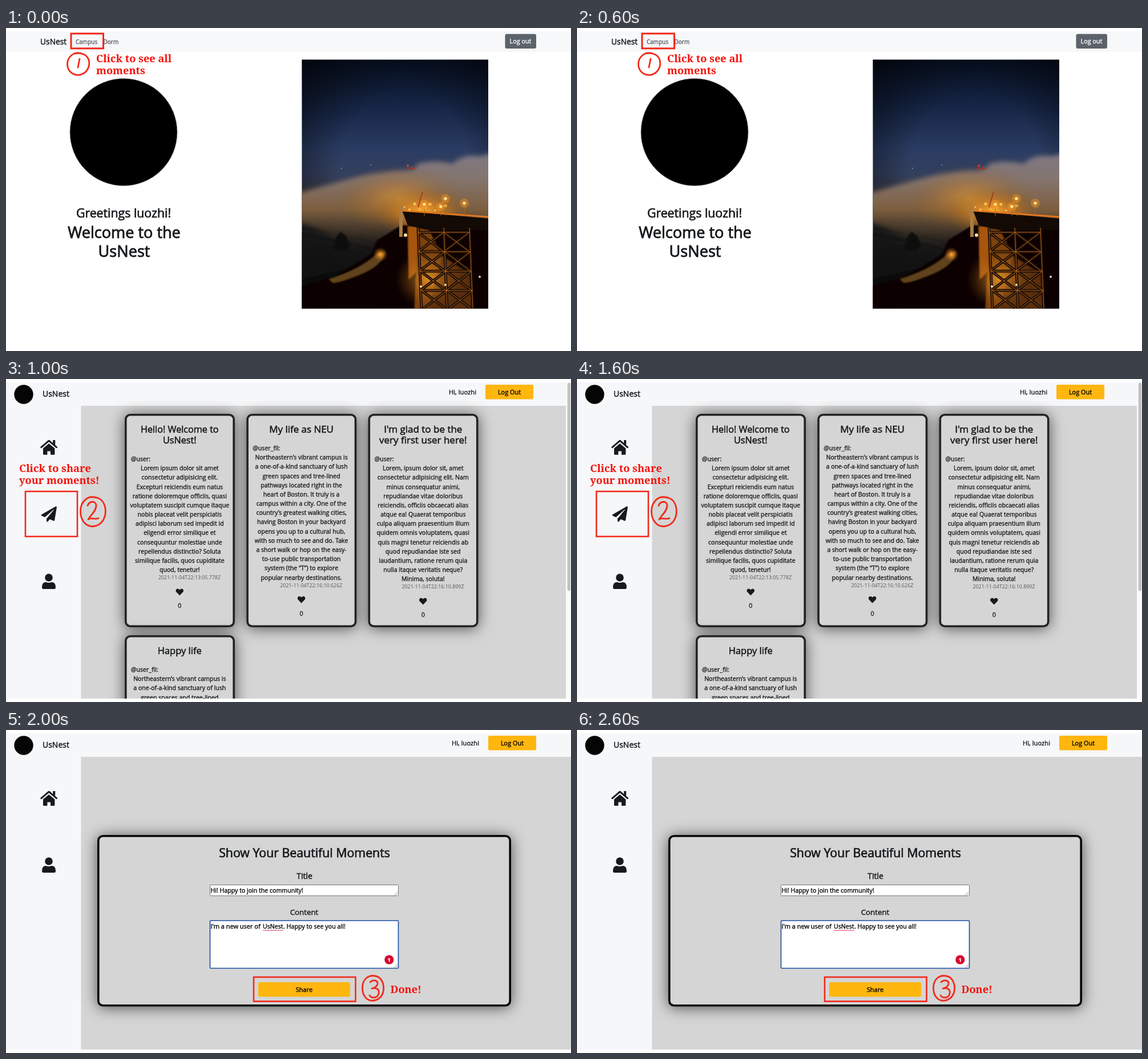
Recreate the animation shown at these times as an HTML page. Size 990 by 566 pixels, loop 3 s.

```html
<!DOCTYPE html>
<html lang="en">
<head>
<meta charset="utf-8">
<title>UsNest walkthrough</title>
<style>
html, body { margin: 0; width: 100%; height: 100%; overflow: hidden; background: #fff; }
svg { display: block; width: 990px; height: 566px; }
text { font-family: "Open Sans", "Noto Sans", sans-serif; white-space: pre; color: #16191c; fill: currentColor; stroke: currentColor; stroke-width: .032em; }
.thin { stroke: none; }
.note { font: bold 18.2px "Noto Serif", serif; color: #f5120a; stroke: none; }
.ink { fill: none; stroke: #f3291a; stroke-linecap: round; stroke-linejoin: round; }
.card { fill: #d5d5d5; stroke-width: 3.6; filter: drop-shadow(0 2px 13px rgba(0,0,0,.62)); }
.icon { fill: #16191d; }
</style>
</head>
<body>
<svg id="stage" viewBox="0 0 990 566">
  <defs>
    <clipPath id="page"><rect y="6" width="990" height="554"/></clipPath>
    <clipPath id="frame"><rect x="518.5" y="55.5" width="326.5" height="436"/></clipPath>
    <linearGradient id="sky" x1="0" y1="0" x2="0" y2="1">
      <stop offset="0" stop-color="#071022"/>
      <stop offset=".2" stop-color="#172748"/>
      <stop offset=".36" stop-color="#2b3c63"/>
      <stop offset=".46" stop-color="#333f5c"/>
      <stop offset=".56" stop-color="#3c3a42"/>
      <stop offset=".7" stop-color="#252322"/>
      <stop offset=".82" stop-color="#0a0909"/>
      <stop offset="1" stop-color="#030303"/>
    </linearGradient>
    <linearGradient id="mist" x1="0" y1="0" x2="0" y2="1">
      <stop offset="0" stop-color="#7e7a88"/>
      <stop offset=".3" stop-color="#84746e"/>
      <stop offset=".6" stop-color="#7d5f3e"/>
      <stop offset="1" stop-color="#3a2c1e" stop-opacity="0"/>
    </linearGradient>
    <radialGradient id="glow">
      <stop offset="0" stop-color="#ffb032"/>
      <stop offset=".35" stop-color="#d98522" stop-opacity=".75"/>
      <stop offset="1" stop-color="#8a5418" stop-opacity="0"/>
    </radialGradient>
    <radialGradient id="shade" cx=".55" cy=".5" r=".72">
      <stop offset=".5" stop-color="#000" stop-opacity="0"/>
      <stop offset="1" stop-color="#000" stop-opacity=".6"/>
    </radialGradient>
    <filter id="soft" x="-30%" y="-30%" width="160%" height="160%"><feGaussianBlur stdDeviation="9"/></filter>
    <filter id="puff" x="-10%" y="-10%" width="120%" height="120%"><feGaussianBlur stdDeviation="4"/></filter>
    <filter id="edge" x="-10%" y="-10%" width="120%" height="120%"><feGaussianBlur stdDeviation="1.3"/></filter>
  </defs>
</svg>
<script>
const stage = document.getElementById('stage');
const LOOP = 3000, STEP = 1000;
const APP = 'UsNest', USER = 'luozhi';
const GREY = '#d5d5d5', PALE = '#f6f7f9', AMBER = '#ffb60f';

const rect = (x, y, w, h, fill, more = '') =>
  `<rect x="${x}" y="${y}" width="${w}" height="${h}" fill="${fill}" ${more}/>`;
const circle = (x, y, r, fill, more = '') =>
  `<circle cx="${x}" cy="${y}" r="${r}" fill="${fill}" ${more}/>`;
const text = (x, y, size, str, more = '') =>
  `<text x="${x}" y="${y}" font-size="${size}" ${more}>${str}</text>`;
const mid = (x, y, size, str, more = '') => text(x, y, size, str, `text-anchor="middle" ${more}`);
const note = (x, y, str) => `<text class="note" x="${x}" y="${y}">${str}</text>`;
const ink = (d, w = 2.8) => `<path class="ink" d="${d}" stroke-width="${w}"/>`;
const box = (x, y, w, h, line) =>
  `<rect class="ink" style="stroke-linejoin:miter" x="${x}" y="${y}" width="${w}" height="${h}" stroke-width="${line}"/>`;
const icon = (d, at = '') => `<path class="icon" d="${d}" transform="${at}"/>`;

// Night photo, reduced to soft tones and plain shapes
function photo() {
  let truss = '';
  for (let i = 0; i < 4; i++) {
    const y = 358 + i * 34, l = 722 + i * 2, r = 812 + i * 2, c = (l + r) / 2;
    truss += `M${l} ${y}H${r}M${l} ${y}L${c} ${y + 34}L${r} ${y}M${l} ${y + 34}L${c} ${y}L${r} ${y + 34}`;
  }
  truss += 'M722 350L728 492M767 350L773 492M812 350L818 492';
  let lamps = '';
  for (let i = 0; i < 9; i++)
    lamps += circle(698 + i * 9, 314 + 6 * Math.sin(i * 2.3), 1.6 + (i % 3) * .5, '#ffc04a');
  const posts = [[770, 299], [803, 307], [762, 313], [733, 309]].map(([x, y]) =>
    `<path d="M${x} ${y}V329" stroke="#b06a1c"/>` + circle(x, y, 8, '#ff9a20', 'opacity=".4"') +
    circle(x, y, 2.8, '#ffe08a')).join('');
  return `<g clip-path="url(#frame)">
    ${rect(518, 55, 328, 438, 'url(#sky)')}
    ${rect(518, 55, 328, 438, 'url(#shade)')}
    <path d="M510 290Q560 276 600 265T690 250Q716 252 722 238Q750 230 782 238Q800 222 822 224T860 212V390H600Q560 350 510 340Z" fill="url(#mist)" filter="url(#puff)"/>
    <ellipse cx="690" cy="300" rx="115" ry="62" fill="url(#glow)" opacity=".55"/>
    <ellipse cx="728" cy="322" rx="85" ry="42" fill="url(#glow)"/>
    <path d="M500 355L590 372 650 385 630 420 500 450Z" fill="#171819" filter="url(#soft)" opacity=".8"/>
    <g filter="url(#edge)">
      <path d="M574 388l4-20 8-11 10 8 6 16-8 8z" fill="#0c0a09"/>
      <path d="M510 455L575 436 640 396 650 372 692 346 850 345V496H510Z" fill="#080605"/>
      <path d="M566 440Q620 424 650 396L664 392Q660 416 620 432T572 446Z" fill="#61421f"/>
      <path d="M704 348H721V425L706 440Z" fill="#a8560f"/>
      <path d="M722 352H740L764 400 752 492H716Z" fill="#7d420c"/>
      <path d="M764 400L812 430 816 492H740Z" fill="#5a2f0b"/>
    </g>
    ${circle(656, 397, 13, 'url(#glow)')}
    <ellipse cx="740" cy="440" rx="58" ry="52" fill="url(#glow)" opacity=".7"/>
    <path d="M689 312h6v54h-6z" fill="#a87c48"/>
    <path d="M694 320L846 334V354H740L704 346Z" fill="#130a05"/>
    <path d="M694 320L846 331" stroke="#e0761f" stroke-width="3"/>
    <path d="${truss}" fill="none" stroke="#1d0e05" stroke-width="5"/>
    <path d="${truss}" fill="none" stroke="#b5651a" stroke-width="1"/>
    <path d="M722 314L730 287M704 240V249M711 242V249M703 246H718" stroke="#a8331f" stroke-width="1.6"/>
    ${circle(704, 241, 1.8, '#ff3c2c')}${lamps}${posts}
    ${circle(770, 450, 2, '#ffe0a0')}${circle(727, 453, 2, '#ffe8c0')}${circle(830, 436, 2, '#d8d4c4')}${circle(700, 363, 3, '#ffe2a8')}
    ${circle(588, 246, 1, '#8d9ab8')}${circle(639, 240, .9, '#8d9ab8')}
  </g>`;
}

function welcome() {
  return rect(0, 6, 990, 36, '#f6f8fa') +
    text(60, 28.5, 13.8, APP) +
    text(122, 27.5, 10, 'Campus', 'style="color:#55595e"') +
    text(170.5, 27.5, 10, 'Dorm', 'style="color:#55595e"') +
    rect(874.5, 10.5, 54.5, 25.5, '#5c636a', 'rx="3"') +
    mid(901.5, 27.3, 10.8, 'Log out', 'style="color:#fff"') +
    box(114, 9.8, 56.5, 26, 3) +
    ink('M133 45C119 40 107 51 107.500 64C108 77 119 84 130 82C142 79 148 67 145 56C142 47 133 43 122 44.500') +
    ink('M129 54L126 69') +
    note(158, 60, 'Click to see all') + note(158, 81, 'moments') +
    circle(206, 182.5, 94, '#000', 'stroke="#8a8a8a" stroke-width=".6"') +
    mid(206, 331.5, 21.3, `Greetings ${USER}!`) +
    mid(207, 368, 27.1, 'Welcome to the') + mid(207, 400.5, 27.1, APP) +
    photo();
}

// Header, sidebar and grey page shared by the two inner screens
function shell(shift, width) {
  return rect(0, 6, 990, 554, PALE) + rect(131.5, 47, width, 513, GREY) +
    circle(31, 27, 16.7, '#050505') + text(64, 31, 14, APP) +
    text(776 + shift, 27.3, 11.2, `Hi, ${USER}`) +
    rect(840 + shift, 10, 84, 25.5, AMBER, 'rx="2.5"') +
    mid(882 + shift, 26.8, 10.9, 'Log Out', 'style="color:#000"') +
    `<path d="M61.800 119.600L75.200 108.200 88.600 119.600" fill="none" stroke="#16191d" stroke-width="3" stroke-linecap="round" stroke-linejoin="round"/>` +
    rect(82.2, 107, 4, 8, '#16191d', 'rx=".6"') +
    icon('M65 121.500L75.200 113 85.400 121.500V131.500Q85.400 132.700 84.200 132.700H78V126.500H72.400V132.700H66.200Q65 132.700 65 131.500Z');
}
const person = y => circle(75, y + 7, 6.8, '#16191d') +
  icon(`M63 ${y + 24}Q63 ${y + 15} 70 ${y + 15}Q75 ${y + 17} 80 ${y + 15}Q87 ${y + 15} 87 ${y + 24}Q87 ${y + 27} 84.500 ${y + 27}H65.500Q63 ${y + 27} 63 ${y + 24}Z`);

const LEAD = 16.18;
const frame = (x, y, w, h, color) =>
  `<rect class="card" x="${x + 1.8}" y="${y + 1.8}" width="${w - 3.6}" height="${h - 3.6}" rx="8" stroke="${color}"/>`;

function card(x, y, head, size, by, body, stamp) {
  const c = x + 96.3, top = y + 64 + (head.length - 1) * 19;
  const end = top + LEAD * body.length;
  return frame(x, y, 193, 374, '#212325') +
    head.map((s, i) => mid(c, y + 32.5 + i * 19, size, s)).join('') +
    text(x + 11, top, 10.6, `@${by}:`) +
    body.map((s, i) => mid(c, top + LEAD * (i + 1), 10.6, s)).join('') +
    text(x + 168, end + 13, 8.9, stamp, 'class="thin" text-anchor="end" style="color:#55595d"') +
    icon('M0 6.200L-5.800 .2C-8.400-3-5-7.400-1.400-5L0-3.700 1.400-5C5-7.400 8.400-3 5.800 .2Z', `translate(${c} ${end + 35})`) +
    mid(c, end + 63, 10.8, '0');
}

const campus = `Northeastern’s vibrant campus is|a one-of-a-kind sanctuary of lush|green spaces and tree-lined|pathways located right in the|heart of Boston. It truly is a|campus within a city. One of the|country’s greatest walking cities,|having Boston in your backyard|opens you up to a cultural hub,|with so much to see and do. Take|a short walk or hop on the easy-|to-use public transportation|system (the “T”) to explore|popular nearby destinations.`.split('|');
const hello = `Lorem ipsum dolor sit amet|consectetur adipisicing elit.|Excepturi reiciendis eum natus|ratione doloremque officiis, quasi|voluptatem suscipit cumque itaque|nobis placeat velit perspiciatis|adipisci laborum sed impedit id|eligendi error similique et|consequuntur molestiae unde|repellendus distinctio? Soluta|similique facilis, quos cupiditate|quod, tenetur!`.split('|');
const first = `Lorem, ipsum dolor sit, amet|consectetur adipisicing elit. Nam|minus consequatur animi,|repudiandae vitae doloribus|reiciendis, officiis obcaecati alias|atque ea! Quaerat temporibus|culpa aliquam praesentium illum|quidem omnis voluptatem, quasi|quis magni tenetur reiciendis ab|quod repudiandae iste sed|laudantium, ratione rerum quia|nulla itaque veritatis neque?|Minima, soluta!`.split('|');

function feed() {
  return shell(0, 849.5) +
    rect(981, 6, 9, 554, '#fafafa') + rect(983.7, 6.5, 5.4, 365, '#c1c1c1', 'rx="2.7"') +
    card(208, 61, ['Hello! Welcome to', APP + '!'], 16.2, 'user', hello, '2021-11-04T22:13:05.778Z') +
    card(421.3, 61, ['My life as NEU'], 16.9, 'user_fil', campus, '2021-11-04T22:16:10.626Z') +
    card(634.5, 61, ['I\'m glad to be the', 'very first user here!'], 17, 'user', first, '2021-11-04T22:16:10.899Z') +
    card(208, 449, ['Happy life'], 16.5, 'user_fil', campus, '') +
    icon('M476 3L12 271C-6 281-3 306 15 314L121 358 408 105C414 100 422 108 417 114L176 407V487C176 511 204 520 218 503L282 426 407 478C421 484 437 475 440 460L512 28C515 8 493-7 476 3Z', 'translate(61.8 223.200) scale(.053)') +
    person(341) +
    note(23, 163, 'Click to share') + note(23, 184, 'your moments!') +
    box(34, 197, 91, 79, 2.6) +
    ink('M158 208C143 203 131 215 130.500 231C130 248 141 260 154 258C168 256 176 243 174 227C172 213 163 206 149 207') +
    ink('M143 222C146 213 158 213 158 222C158 231 149 238 144 246C150 242 155 247 162 244');
}

const grip = (x, y) => `<path d="M${x - 6} ${y}L${x} ${y - 6}M${x - 3} ${y}L${x} ${y - 3}" stroke="#777" stroke-width=".7"/>`;

function form() {
  const black = 'style="color:#000"';
  return shell(5, 858.5) + person(223) +
    frame(160, 184, 725, 300.5, '#050505') +
    mid(523, 223, 21.3, 'Show Your Beautiful Moments') +
    mid(523, 261, 14, 'Title') + mid(522.5, 324, 13.3, 'Content') +
    rect(357.5, 271.5, 330, 19, '#fff', 'stroke="#767676" rx="1"') + grip(686, 289.5) +
    text(358.5, 285, 10.6, 'Hi! Happy to join the community!', black) +
    rect(357.5, 334, 330, 83.5, '#fff', 'stroke="#1b4ea3" stroke-width="1.6" rx="1.5"') + grip(686, 416) +
    text(358.5, 347.5, 11, 'I\'m a new user of', black) + text(450, 347.5, 10.6, APP, black) +
    text(486, 347.5, 10.7, '. Happy to see you all!', black) +
    rect(450, 350.3, 36, 1.6, '#f07f93') +
    circle(671.3, 402.5, 8.1, '#d9072f') +
    mid(671.3, 406, 9.5, '1', 'style="color:#fff;font-weight:700"') +
    rect(442, 442, 161, 25.5, AMBER, 'rx="2.5"') + mid(522.5, 459, 11, 'Share', black) +
    box(434, 433, 178.5, 42.5, 2.6) +
    ink('M650 432C636 427 625 436 624.500 451C624 466 633 476 645 474C657 472 664 460 661 446C658 434 650 429 638 431') +
    ink('M638 442C642 437 652 438 651 445C650 450 645 452 641 453C648 451 655 454 653 462C651 470 641 471 637 465') +
    note(673.5, 461, 'Done!');
}

stage.insertAdjacentHTML('beforeend',
  [welcome, feed, form].map(f => `<g class="scene" clip-path="url(#page)">${f()}</g>`).join(''));
const scenes = [...stage.querySelectorAll('.scene')];

function draw(t) {
  const now = Math.floor((t % LOOP) / STEP);
  scenes.forEach((g, i) => g.setAttribute('display', i === now ? 'inline' : 'none'));
}

const start = performance.now();
function tick() {
  draw(performance.now() - start);
  requestAnimationFrame(tick);
}
tick();
</script>
</body>
</html>
```
